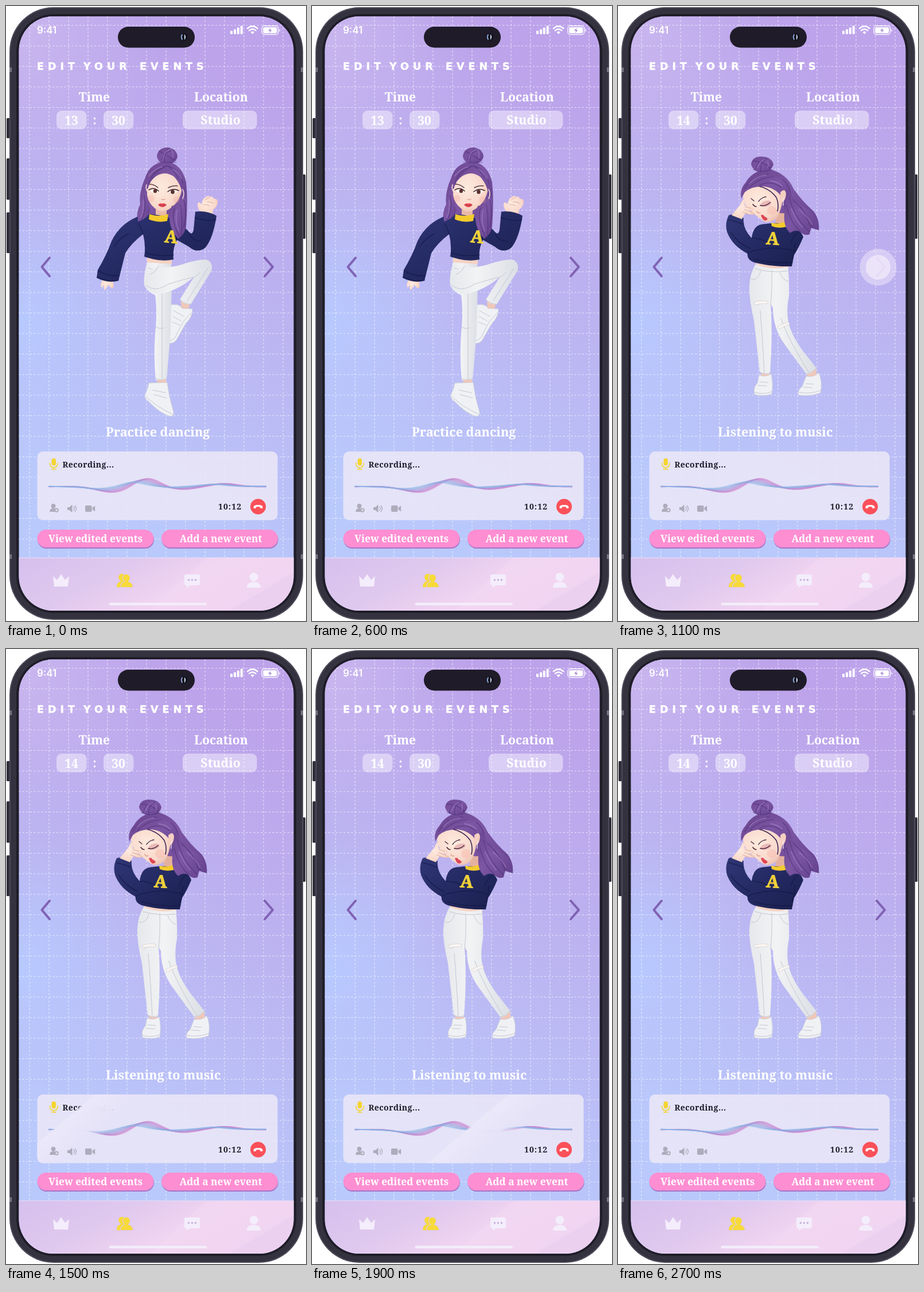
Animation, 523 px wide and 1070 px high, one loop 2770 ms. Source, as an HTML page:

```html
<!DOCTYPE html>
<html lang="en">
<head>
<meta charset="utf-8">
<title>Edit your events</title>
<style>
  html, body { margin: 0; width: 100%; height: 100%; overflow: hidden; background: #fff; }
  svg { display: block; width: 100vw; height: 100vh; }
  text { font-family: "Noto Serif", serif; font-weight: 700; fill: #fff; }
  .mid { text-anchor: middle; }
  .big { font-size: 21.2px; }
  .btn { font-size: 17.3px; }
  .title { font: 700 17.5px "DejaVu Sans", sans-serif; letter-spacing: 7px; }
  .clock { font: 600 17px Inter, sans-serif; }
  .ink { fill: #1d1a2a; font-size: 14px; }
  .badge { fill: #efd13a; stroke: #efd13a; font-size: 30px; }
  .line { fill: none; stroke-linecap: round; stroke-linejoin: round; }
  .strand { fill: none; stroke: #42286a; stroke-width: 1.2; opacity: .55; stroke-linecap: round; }
  .glow { fill: none; stroke: #a37fc4; stroke-width: 1.8; opacity: .6; stroke-linecap: round; }
  .fold { fill: none; stroke: #c3c8d1; stroke-width: 1; stroke-linecap: round; }
  .knit { fill: none; stroke: #131846; stroke-width: 1.5; opacity: .65; stroke-linecap: round; }
  .shoe { fill: #f0f1f4; stroke: #c9ccd5; stroke-width: .8; }
</style>
</head>
<body>
<svg viewBox="0 0 523 1070" preserveAspectRatio="none">
  <defs>
    <linearGradient id="sky" gradientUnits="userSpaceOnUse" x1="440" y1="130" x2="60" y2="820">
      <stop offset="0" stop-color="#bda3ea"/><stop offset=".45" stop-color="#bcb4f1"/>
      <stop offset="1" stop-color="#b9c9fc"/>
    </linearGradient>
    <radialGradient id="haze" gradientUnits="userSpaceOnUse" cx="20" cy="40" r="260">
      <stop offset="0" stop-color="#cab6ee"/><stop offset="1" stop-color="#c4b4f0" stop-opacity="0"/>
    </radialGradient>
    <radialGradient id="mist" gradientUnits="userSpaceOnUse" cx="20" cy="560" r="230">
      <stop offset="0" stop-color="#b7caff"/><stop offset="1" stop-color="#b8c4fb" stop-opacity="0"/>
    </radialGradient>
    <linearGradient id="bar" x1="0" y1="0" x2="1" y2=".35">
      <stop offset="0" stop-color="#d6c0ed"/><stop offset=".4" stop-color="#e0c9ee"/>
      <stop offset=".68" stop-color="#f0d4f1"/><stop offset="1" stop-color="#ecd0ef"/>
    </linearGradient>
    <linearGradient id="navy" x1="0" x2="1" y1="0" y2="1">
      <stop offset="0" stop-color="#2f3675"/><stop offset=".5" stop-color="#242a62"/><stop offset="1" stop-color="#1a1f4e"/>
    </linearGradient>
    <linearGradient id="hair" x1="0" x2="1" y1="0" y2="1">
      <stop offset="0" stop-color="#6b458f"/><stop offset=".45" stop-color="#7c56a3"/><stop offset="1" stop-color="#63408c"/>
    </linearGradient>
    <linearGradient id="denim" x1="0" x2="1" y1="0" y2="0">
      <stop offset="0" stop-color="#e6e8ec"/><stop offset=".4" stop-color="#f2f3f4"/><stop offset="1" stop-color="#dcdfe5"/>
    </linearGradient>
    <radialGradient id="skin" cx=".4" cy=".4" r=".75">
      <stop offset="0" stop-color="#fdeade"/><stop offset=".65" stop-color="#f9d9cb"/><stop offset="1" stop-color="#e6b5a5"/>
    </radialGradient>
    <linearGradient id="sheen">
      <stop offset="0" stop-color="#e9e6f8" stop-opacity="0"/><stop offset=".07" stop-color="#eae8f9"/>
      <stop offset=".62" stop-color="#e7e4f8" stop-opacity=".96"/><stop offset="1" stop-color="#e5e2f7" stop-opacity="0"/>
    </linearGradient>
    <clipPath id="screen"><rect x="22.5" y="18" width="479" height="1034" rx="60"/></clipPath>
    <clipPath id="card"><rect x="54.5" y="775" width="419" height="119.5" rx="10"/></clipPath>
  </defs>

  <!-- phone body -->
  <g fill="#302e3a">
    <rect x="1" y="195" width="6" height="35" rx="1.5"/><rect x="1" y="265" width="6" height="72" rx="1.5"/>
    <rect x="1" y="359" width="6" height="71" rx="1.5"/><rect x="516" y="293" width="6" height="112" rx="1.5"/>
  </g>
  <rect x="6" y="2" width="512" height="1066" rx="77" fill="#4d4b59"/>
  <rect x="8" y="4" width="508" height="1062" rx="75" fill="#34323f"/>
  <rect x="18" y="14" width="488" height="1042" rx="65" fill="#1f1d28"/>
  <path d="M6 107h4v8H6zM514 107h4v8h-4zM6 954h4v8H6zM514 954h4v8h-4z" fill="#777583"/>

  <g clip-path="url(#screen)">
    <rect x="22" y="18" width="480" height="1034" fill="url(#sky)"/>
    <rect x="22" y="18" width="480" height="400" fill="url(#haze)"/>
    <rect x="22" y="300" width="300" height="500" fill="url(#mist)"/>
    <path id="grid" fill="none" stroke="#fff" stroke-width="1.1" stroke-opacity=".66" stroke-dasharray="3.2 3.4"/>
    <rect x="22" y="960" width="480" height="93" fill="url(#bar)"/>
    <path d="M22 960H502" stroke="#eddff7"/>
    <path d="M250 1052L350 960H502V985L390 1052Z" fill="#f5daf3" opacity=".4"/>
  </g>

  <!-- status bar -->
  <rect x="195" y="36" width="134" height="36.5" rx="18.2" fill="#1f1b28"/>
  <circle cx="310" cy="54" r="6.5" fill="#10131f"/>
  <path class="line" d="M307 50q-2.5 4 0 8" stroke="#8fa5d8" stroke-width="2"/>
  <path d="M311 49q4 5 0 10z" fill="#dfe8fb"/>
  <text x="54" y="47.5" class="clock">9:41</text>
  <g fill="#fff">
    <rect x="391" y="43" width="4" height="6" rx="1"/><rect x="397" y="40.5" width="4" height="8.5" rx="1"/>
    <rect x="402.8" y="37.5" width="4" height="11.5" rx="1"/><rect x="408.7" y="34.5" width="4" height="14.5" rx="1"/>
    <path d="M426.5 45.5q3.2-2.4 6.4 0l-3.2 3.5z"/>
    <rect x="448.3" y="37" width="24" height="10.5" rx="2.4"/><path d="M476.5 39.5q3 2.8 0 5.6z"/>
  </g>
  <path class="line" d="M421 39q8.7-7.5 17.4 0M424 42.6q5.7-4.6 11.4 0" stroke="#fff" stroke-width="2.5"/>
  <rect x="446" y="34.7" width="28.6" height="15" rx="4.5" fill="none" stroke="#fff" stroke-width="1.3"/>
  <path d="M461.5 38l-4.5 5h3l-1 4 4.6-5.2h-3z" fill="#a48fd0"/>

  <!-- heading -->
  <text y="111" class="title" stroke="#fff" stroke-width=".5"><tspan x="54">EDIT</tspan><tspan x="135">YOUR</tspan><tspan x="233">EVENTS</tspan></text>
  <g fill="#fff" fill-opacity=".43">
    <rect x="88" y="182" width="52.5" height="32.5" rx="9"/><rect x="170" y="182" width="52.5" height="32.5" rx="9"/>
    <rect x="308" y="182" width="129.5" height="32.5" rx="9"/>
  </g>
  <g class="mid big">
    <text x="154" y="165.5">Time</text><text x="375" y="165.5">Location</text>
    <text x="114" y="207" id="hour">13</text><text x="154.5" y="206">:</text>
    <text x="196" y="207">30</text><text x="374" y="205.5">Studio</text>
  </g>

  <!-- dancing pose -->
  <g id="dance">
    <path d="M243 298Q231 325 234 345Q227 358 229 373Q242 377 254 366L300 370Q303 391 296 404Q309 403 313 389Q318 345 314 306Q306 274 279 270Q250 274 243 298Z" fill="url(#hair)"/>
    <path d="M263 262Q264 247 281 246Q298 248 299 262Q296 274 281 275Q266 275 263 262Z" fill="url(#hair)"/>
    <path class="strand" d="M268 253q13 8 28 16M270 268q8-16 24-17M277 273q-4-14 7-26M264 272h33"/>
    <path class="glow" d="M274 265q2-12 11-15M291 264q1-8-2-13"/>
    <path d="M168 477Q163 487 167 490L171 485Q169 495 173 494L178 485L184 491Q189 492 187 484L188 476Z" fill="url(#skin)"/>
    <path d="M341 361Q333 352 334 344Q336 339 341 345Q343 333 348 333Q352 328 356 332Q361 330 362 335Q370 335 369 342Q368 350 361 354L360 364Z" fill="url(#skin)"/>
    <path d="M344 346q6-2 11 2M350 341q8-1 12 3M347 338q4-4 8-5" stroke="#d9a392" stroke-width=".9" fill="none"/>
    <path d="M246 432H289V450H246Z" fill="#f5d2c3"/>
    <path d="M261 348H280V370H261Z" fill="#e9b9a8"/>
    <path d="M305 515L322 513L317 531L306 528Z" fill="#f0c7b8"/>
    <path d="M263 645H279V662H264Z" fill="#f0c7b8"/>
    <path class="shoe" d="M283 521Q302 516 307 526L325 527Q326 540 313 553L300 576Q295 587 286 587Q280 584 281 562Z"/>
    <path class="fold" d="M286 582q9-2 12-12l11-21 14-15M292 530l18 10M291 540l14 8M290 550l13 5"/>
    <path class="shoe" d="M249 656L281 655Q284 680 292 706Q293 714 286 714Q271 709 258 697L243 683Q240 678 246 668Z"/>
    <path class="fold" d="M244 680q18 17 46 30M256 668l22 5M258 676l22 6"/>
    <path d="M246 446Q239 470 241 486Q247 498 260 503Q264 530 260 570Q257 612 261 651L280 650Q283 616 287 567Q288 520 289 488L288 449Z" fill="url(#denim)"/>
    <path class="fold" d="M272 500q0 78 0 150M248 456q15 5 38-1M261 648q9 5 19 0M261 558q7 5 14 2"/>
    <path d="M259 454Q285 457 309 449Q340 439 352 442Q362 449 358 461L322 519Q310 520 303 511L328 471Q302 494 269 501Q250 500 242 484Q247 462 259 454Z" fill="url(#denim)"/>
    <path class="fold" d="M244 486q16 13 39-2 28-9 47-13l8-7M352 456l-36 57M266 452q-4 11-15 15M304 511q8 8 18 8"/>
    <path d="M236 364Q259 358 297 373Q310 383 319 393Q325 400 327 389L330 358Q349 355 367 365Q361 405 347 421Q333 431 319 419L298 407Q290 422 292 441Q269 446 241 436Q244 417 239 397Q218 413 208 430L196 478Q178 483 158 473L160 459Q175 434 184 409Q200 376 236 364Z" fill="url(#navy)"/>
    <path class="knit" d="M239 397q-3-12-8-18M161 461q17 10 36 8M244 430q24 7 48 3M329 368q18 7 37 4M298 407q-1-8 1-16M320 397q5 12 20 12M188 418q12-16 26-22M159 472q18 9 37 5"/>
    <path d="M250 362Q266 368 283 362L281 374Q264 378 249 371Z" fill="#f4cb2d"/>
    <path d="M246 310Q252 291 275 288Q302 291 307 316Q305 338 288 351Q275 361 266 356Q249 347 246 329Z" fill="url(#skin)"/>
    <path d="M244 313Q242 287 269 278Q304 274 313 306L314 328L309 342Q309 314 293 297Q280 288 268 293Q252 299 247 319Z" fill="url(#hair)"/>
    <path d="M289 348Q302 346 309 327Q318 342 314 369Q317 394 300 405Q287 391 285 373Q284 360 289 348Z" fill="url(#hair)"/>
    <path d="M246 314Q243 338 252 355Q249 369 230 375Q228 356 235 344Q232 328 246 314Z" fill="url(#hair)"/>
    <path class="strand" d="M249 309q5-23 31-31M254 301q10-17 27-23M308 309q-4-25-27-31M300 300q-7-16-19-22M294 351q-8 22 9 51M304 345q4 23 2 55M241 330q5 24-6 44M310 338q6 20 0 47"/>
    <path class="glow" d="M249 296q9-13 23-16M291 284q11 6 15 16M298 355q-4 17 3 36M239 338q2 16-4 30"/>
    <path class="line" d="M245 311q-2 6 1 11M308 319q4 8 0 16" stroke="#f9e3dc" stroke-width="1.5"/>
    <path d="M251 322Q258 316 266 323Q259 327 251 322ZM283 324Q291 318 299 323Q292 329 283 324Z" fill="#fff"/>
    <g fill="#5b302f"><circle cx="260" cy="322" r="3.2"/><circle cx="290.5" cy="323.5" r="3.4"/></g>
    <path class="line" d="M249 320q9-6 17 2M282 323q9-7 19-2" stroke="#3a202a" stroke-width="1.5"/>
    <path class="line" d="M250 310q8 0 15 6M283 316q8-4 16-3" stroke="#5b3a48" stroke-width="1.4"/>
    <path class="line" d="M271 336q3 2 6 0" stroke="#d99b8c" stroke-width="1.3"/>
    <path d="M265 346Q269 342 272 344Q276 342 280 346Q273 354 265 346Z" fill="#e34854"/>
    <path d="M266 346q7 2 13 0" stroke="#a92f3e" stroke-width=".8" fill="none"/>
    <g fill="#f4a79b" opacity=".28"><circle cx="253" cy="335" r="6"/><circle cx="297" cy="337" r="6"/></g>
    <text class="mid badge" transform="translate(287 412) rotate(6)">A</text>
  </g>

  <!-- listening pose -->
  <g id="listen">
    <path d="M218 318Q219 330 233 338L281 334Q284 356 278 373Q288 390 299 394Q309 388 318 393Q326 401 334 397Q332 391 337 386Q346 389 350 390Q352 372 341 357Q322 341 306 318Q294 291 264 284Q228 286 218 318Z" fill="url(#hair)"/>
    <path d="M232 275Q234 262 250 262Q268 262 271 276Q267 289 251 290Q235 288 232 275Z" fill="url(#hair)"/>
    <path class="strand" d="M235 270q16-1 31 13M239 285q4-15 19-20M249 289q-3-16 11-23M235 284q17 8 34 0"/>
    <path class="glow" d="M243 281q4-12 13-14M261 281q2-6 0-10"/>
    <path d="M277 360L296 361L295 386H273Z" fill="#e5b19f"/>
    <path d="M241 444H297V461H240Z" fill="#f5d2c3"/>
    <path d="M249 631H264V649H250ZM327 633L345 628L347 646L331 648Z" fill="#f0c7b8"/>
    <path class="shoe" d="M246 642Q257 647 267 640Q271 658 268 675Q254 680 238 676Q235 664 243 656Z"/>
    <path class="shoe" d="M328 644Q341 647 350 638Q357 654 353 673Q335 680 315 677Q312 669 321 662Z"/>
    <path class="fold" d="M238 672q15 5 30-1M315 672q19 4 38-3M247 654l14 1M244 660l15 1M327 657l14 1M323 663l15 1"/>
    <path d="M240 449Q268 461 296 454Q299 475 298 505Q293 529 297 549Q301 571 323 601L346 630Q337 641 329 641Q311 617 290 588Q270 560 270 525L266 519Q270 570 265 639Q256 643 247 637Q242 591 237 547Q228 507 229 487Q230 465 240 449Z" fill="url(#denim)"/>
    <path class="fold" d="M239 457q28 8 56 4M268 460q1 34-2 61M232 475q12 4 17-14M282 464q6 14 15 15M248 530q4 49 7 108M284 543q12 36 49 95M247 637q9 5 18 1M329 640q10-2 17-10M242 520q9-5 18-4"/>
    <path d="M237 516q12-5 25-2l-2 4q-10-1-21 2zM278 558q10-6 20-8l1 4q-9 2-18 8z" fill="#fbf5f2" stroke="#cac9ce" stroke-width=".6"/>
    <path d="M193 364Q207 359 219 369Q217 387 233 404Q235 386 246 381Q272 375 296 380Q319 388 323 402Q315 421 307 433L303 453Q268 454 237 446Q224 441 226 431Q199 417 190 393Q186 378 193 364Z" fill="url(#navy)"/>
    <path class="knit" d="M193 372q14 3 25 8M233 404q17 0 31 9M226 431q9-7 22-7 22-7 58 2M304 440q5-17 4-28M237 440q32 9 67 6M197 394q11 18 33 28M314 393q-9 7-12 18"/>
    <path d="M267 377Q280 381 294 374L294 384Q280 388 268 383Z" fill="#f4cb2d"/>
    <path d="M219 324Q231 309 258 312Q281 314 288 332Q285 355 277 369Q265 379 253 374Q238 363 230 354Q215 343 219 324Z" fill="url(#skin)"/>
    <path d="M215 335Q211 314 229 302Q258 286 288 304Q304 314 303 339L293 359Q286 350 285 331Q273 316 254 314Q233 313 221 324Z" fill="url(#hair)"/>
    <path d="M294 317Q304 336 320 348Q340 357 349 376Q350 384 350 390Q343 384 337 386Q335 392 334 397Q326 400 318 393Q309 388 300 395Q288 384 290 362Z" fill="url(#hair)"/>
    <path class="strand" d="M221 318q9-21 42-26M230 315q16-16 41-18M247 312q20-10 38 4M299 332q6 33 34 60M293 346q8 32 25 46M306 338q22 20 33 47M287 302q10 8 13 20M318 349q10 14 18 36"/>
    <path class="glow" d="M229 309q11-13 29-15M266 304q13 2 20 9M302 353q8 19 19 32M316 354q15 12 22 26"/>
    <path class="line" d="M247 314q18 4 29 19 5 11 2 24" stroke="#3d2357" stroke-width="1.6"/>
    <path d="M283 324Q291 316 293 326Q292 341 284 342Z" fill="#f5cfc0"/>
    <path class="line" d="M288 334v13" stroke="#f5e7f2" stroke-width="1.3"/>
    <ellipse cx="258" cy="344" rx="10" ry="5" transform="rotate(-16 258 344)" fill="#d88f9b" opacity=".5"/>
    <path class="line" d="M248 347q9 2 17-5M235 345q3 4 6 4" stroke="#442233" stroke-width="1.5"/>
    <path class="line" d="M245 340q5-7 13-8M232 335l5 4" stroke="#4e3048" stroke-width="1.4"/>
    <path class="line" d="M242 357q1 4 6 3" stroke="#d99b8c" stroke-width="1.3"/>
    <path d="M249 364Q254 362 255 366Q259 367 261 371Q254 378 249 364Z" fill="#df4656"/>
    <circle cx="268" cy="356" r="8" fill="#f4a79b" opacity=".3"/>
    <path d="M198 364Q208 352 213 346Q218 334 220 337Q220 344 221 347L233 350Q239 352 235 356L227 355L238 360Q239 364 233 363L222 361Q219 365 216 371Z" fill="url(#skin)"/>
    <path d="M221 349l11 3M220 354l14 5M217 358l12 5" stroke="#d9a392" stroke-width=".9" fill="none"/>
    <text class="mid badge" transform="translate(269 415) rotate(4)">A</text>
  </g>

  <g class="line" stroke="#8062b4" stroke-width="4">
    <path d="M76 438L62.500 454L76 470"/><path d="M451 438L465 454L451 470"/>
  </g>
  <g id="tap" fill="#f1eafb">
    <circle cx="453.5" cy="454.5" r="32" opacity=".5"/><circle cx="453.5" cy="454.5" r="21.5" opacity=".82"/>
  </g>

  <text id="mood" x="174" y="748.5" font-size="21.6">Practice dancing</text>

  <!-- recorder -->
  <rect x="54.5" y="775" width="419" height="119.5" rx="10" fill="#ebe8f8" fill-opacity=".88"/>
  <rect x="79.5" y="787" width="7.5" height="12.5" rx="3.7" fill="#f5d432"/>
  <path class="line" d="M76.500 795q0 8 6.800 8t6.800-8M83.300 803v3M79.500 806h7.600" stroke="#f5d432" stroke-width="1.5"/>
  <text x="98.5" y="802.5" class="ink" letter-spacing=".45">Recording...</text>
  <g id="wave" class="line"></g>
  <g clip-path="url(#card)"><g id="shine"><rect y="-64" width="104" height="130" transform="skewX(-50)" fill="url(#sheen)"/></g></g>
  <g fill="#aeabbb">
    <circle cx="82.5" cy="870" r="3.9"/><path d="M76 880q0-6 6.500-6 2 0 3.500 1-2 3 0 5z"/><circle cx="88" cy="877.3" r="3.7"/>
    <path d="M107 872h3.500l5-4.500v14l-5-4.500H107z"/>
    <rect x="138" y="869" width="11.5" height="11" rx="2"/><path d="M150.500 873l4.700-3.500v10l-4.700-3.500z"/>
  </g>
  <path d="M88 875v4.600M85.700 877.300h4.600" stroke="#eeebf8" stroke-width="1.1"/>
  <path class="line" d="M118 871.500q2.500 3 0 6M120.300 869.500q4.500 5 0 10" stroke="#aeabbb" stroke-width="1.3"/>
  <text x="370" y="876" class="ink" letter-spacing="1.1">10:12</text>
  <circle cx="439.5" cy="871" r="13.5" fill="#fa5059"/>
  <path d="M431.500 872q0-4 8-4t8 4l-.5 2.200-4-.8-.4-2.200h-6.200l-.4 2.200-4 .8z" fill="#fff"/>

  <!-- buttons -->
  <g fill="#a774c8"><rect x="55" y="913" width="203" height="31" rx="15.5"/><rect x="271.5" y="913" width="203" height="31" rx="15.5"/></g>
  <g fill="#fd8ed2"><rect x="54.5" y="911" width="203" height="31" rx="15.5"/><rect x="271" y="911" width="203" height="31" rx="15.5"/></g>
  <g class="mid btn"><text x="156" y="933">View edited events</text><text x="374.5" y="933">Add a new event</text></g>

  <!-- tabs -->
  <g fill="#f4edfb">
    <path d="M82 992l7 6.500 7-10 7 10 7-6.500-2 18H84z"/>
    <path d="M314 989h21q3 0 3 3v13q0 3-3 3h-14l-6 4v-4h-1q-3 0-3-3v-13q0-3 3-3z"/>
    <circle cx="432" cy="993.5" r="7.5"/><path d="M420 1012q0-10 12-10t12 10z"/>
    <rect x="179.5" y="1038.3" width="170.5" height="4.5" rx="2.2"/>
  </g>
  <g fill="#c7b2de"><circle cx="318.5" cy="998.5" r="1.7"/><circle cx="324.5" cy="998.5" r="1.7"/><circle cx="330.5" cy="998.5" r="1.7"/></g>
  <g fill="#f7da39" stroke="#dfc8ee" stroke-width="1.2">
    <path d="M192.500 1011.500q0-9 7-11-4-3-4-7 1-6 7-6 6 0 6 7l-2 17.500z"/>
    <path d="M199.500 1011.500q0-8 7-10-3-3-3-7 1-6 6.500-6t6.500 6q0 4-3 7 8 2 8 10z"/>
  </g>
</svg>
<script>
  const LOOP = 2770, STEP = 100;
  const $ = id => document.getElementById(id);
  const show = (id, on) => $(id).setAttribute('visibility', on ? 'visible' : 'hidden');

  // dashed backdrop
  let grid = '';
  for (let x = 41; x < 502; x += 34) grid += `M${x} 18V960`;
  for (let y = 33.5; y < 960; y += 35.75) grid += `M22 ${y}H502`;
  $('grid').setAttribute('d', grid);

  // sound wave: a family of curves drifting from pink to blue
  const bell = (x, c, w) => Math.exp(-(((x - c) / w) ** 2));
  const swell = x => 9 * bell(x, 185, 36) - 14 * bell(x, 242, 30) + 4 * bell(x, 306, 30) - 5.5 * bell(x, 379, 30);
  const mix = (a, b, k) => Math.round(a + (b - a) * k);
  const COUNT = 24;
  let strands = '';
  for (let i = 0; i < COUNT; i++) {
    const k = i / (COUNT - 1);
    let d = '';
    for (let x = 75; x <= 453; x += 3) {
      const spread = (.5 - k) * (1 + 4 * bell(x, 215, 110) * Math.sin(x / 21));
      const y = 836 + swell(x - 7 + 28 * k) * (1 - .4 * k) + spread;
      d += `${d ? 'L' : 'M'}${x} ${y.toFixed(1)}`;
    }
    strands += `<path d="${d}" stroke="rgb(${mix(208, 132, k)},${mix(118, 182, k)},${mix(200, 228, k)})" stroke-width="1.9" opacity=".26"/>`;
  }
  $('wave').innerHTML = strands;

  function draw(time) {
    const t = Math.floor((time % LOOP) / STEP) * STEP;
    const later = t >= 1100;
    show('dance', !later);
    show('listen', later);
    show('tap', t >= 800 && t < 1200);
    $('hour').textContent = later ? '14' : '13';
    $('mood').textContent = later ? 'Listening to music' : 'Practice dancing';
    $('shine').setAttribute('transform', `translate(${80 + (t - 1500) * .47} 835)`);
  }

  const start = performance.now();
  function tick(now) {
    draw(Math.max(0, now - start));
    requestAnimationFrame(tick);
  }
  draw(0);
  requestAnimationFrame(tick);
</script>
</body>
</html>
```
